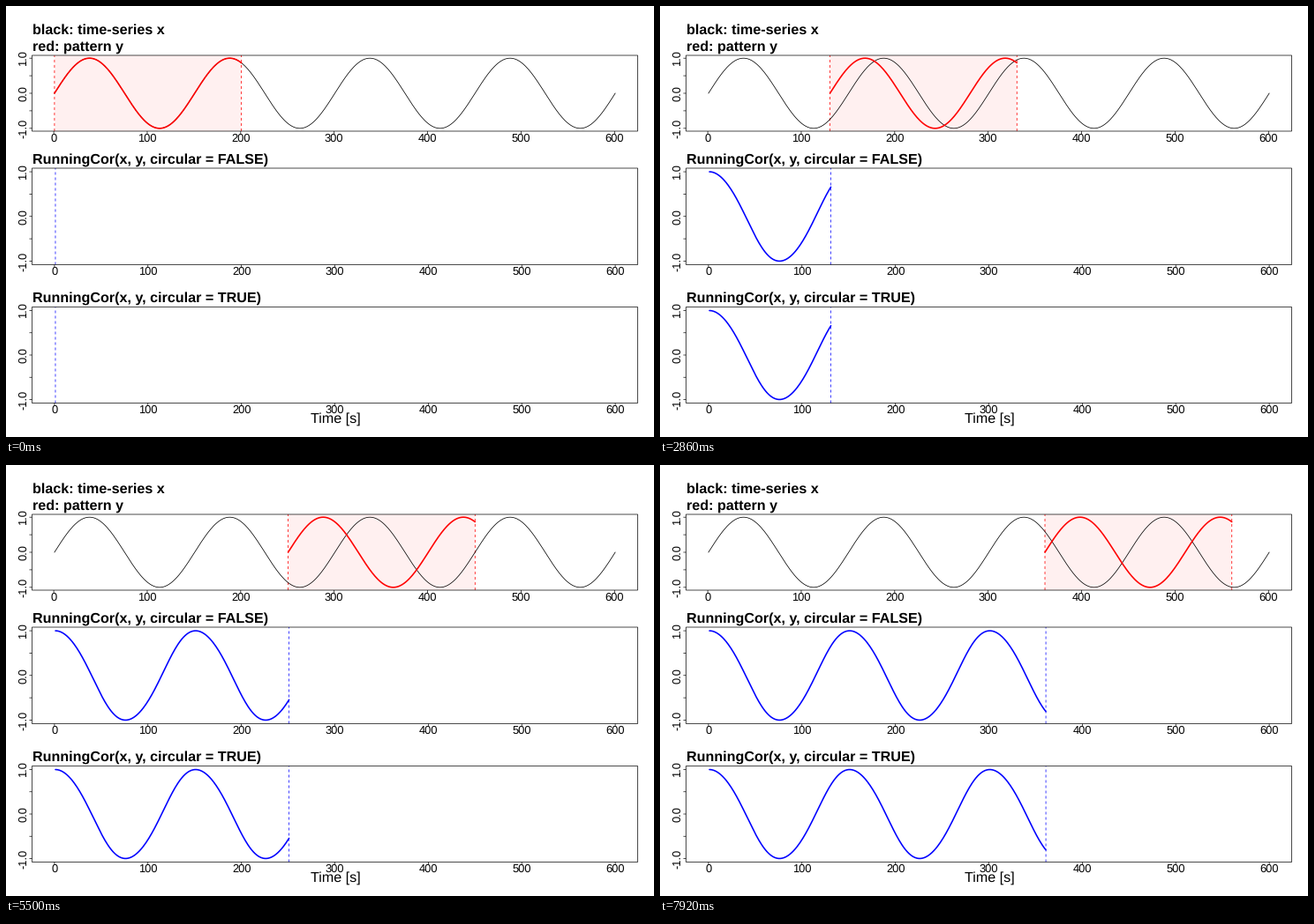
Recreate the animation shown at these times as a matplotlib script. Size 734 px wide and 489 px high, loop 8 s.

```python
import numpy as np
import matplotlib.pyplot as plt
from matplotlib.animation import FuncAnimation
from matplotlib.collections import LineCollection
from matplotlib.patches import Rectangle

W, H, DPI = 734, 489, 64  # a power of two keeps the pixel size exact
TICK_MS, LOOP_MS, STEP_MS = 20, 8000, 220
STEP, WINDOW, PERIOD, LENGTH = 10, 200, 150, 600
LEFT, RIGHT = 29.5, 715.5
PX = 72 / DPI  # points per pixel

plt.rcParams.update({"font.family": "Liberation Sans", "text.hinting": "none",
                     "path.snap": False})

fig = plt.figure(figsize=(W / DPI, H / DPI), dpi=DPI, facecolor="white")
ax = fig.add_axes([0, 0, 1, 1])
ax.set(xlim=(0, W), ylim=(H, 0))
ax.axis("off")

SCALE = (RIGHT - LEFT) / 1.08 / LENGTH
X0 = LEFT + 0.04 * LENGTH * SCALE


def to_x(t):
    return X0 + SCALE * np.asarray(t)


def label(x, y, text, size, **kw):
    ax.text(x, y, text, fontsize=size * PX, va="baseline",
            rotation_mode="anchor", **kw)


def line(color, width, z, **kw):
    return ax.plot([], [], color=color, lw=width * PX, zorder=z, **kw)[0]


class Panel:
    def __init__(self, top, bottom, titles, shift=0):
        self.top, self.bottom = top, bottom
        self.mid = (top + bottom) / 2
        self.amp = (bottom - top) / 2.16
        ax.add_patch(Rectangle((LEFT, top), RIGHT - LEFT, bottom - top,
                               fill=False, lw=0.7 * PX, zorder=6))
        ticks = []
        for t in range(0, LENGTH + 1, 100):
            x = to_x(t) + shift
            ticks.append([(x, bottom), (x, bottom + 3)])
            label(x, bottom + 11.5, str(t), 12.9, ha="center")
        for v in (-1, -0.5, 0, 0.5, 1):
            y = self.to_y(v)
            ticks.append([(LEFT - 3, y), (LEFT, y)])
            if abs(v) != 0.5:
                label(23, y, f"{v:.1f}", 12.9, ha="center", rotation=90)
        ax.add_collection(LineCollection(ticks, colors="black",
                                         linewidths=0.7 * PX))
        for i, text in enumerate(reversed(titles)):
            label(LEFT, top - 5.5 - 19 * i, text, 16.08, weight="bold")

    def to_y(self, v):
        return self.mid - self.amp * np.asarray(v)

    def marker(self, color):
        return line(color, 0.75, 2, dashes=(4, 4), dash_capstyle="butt")

    def place(self, marker, x):
        marker.set_data([x, x], [self.bottom, self.top])


def wave(t):
    return np.sin(2 * np.pi * t / PERIOD)


series = Panel(56, 142, ["black: time-series x", "red: pattern y"], shift=-0.8)
results = [Panel(184, 293.5, ["RunningCor(x, y, circular = FALSE)"]),
           Panel(341.5, 450.5, ["RunningCor(x, y, circular = TRUE)"])]
label(373, 473, "Time [s]", 16.08, ha="center")

t_all = np.arange(LENGTH + 1)
t_win = np.arange(WINDOW + 1)
pattern = wave(t_win)
lags = np.arange(LENGTH - WINDOW + 1)
cor = np.array([np.corrcoef(wave(t_win + k), pattern)[0, 1] for k in lags])

line("black", 0.75, 3).set_data(to_x(t_all), series.to_y(wave(t_all)))
band = ax.add_patch(Rectangle((0, series.top), WINDOW * SCALE,
                              series.bottom - series.top,
                              color="red", alpha=0.06, lw=0, zorder=1))
red = line("red", 1.6, 4, solid_capstyle="round")
edges = [series.marker("red") for _ in range(2)]
curves = [line("blue", 1.6, 4, solid_capstyle="round") for _ in results]
cursors = [p.marker("blue") for p in results]


def update(i):
    k = STEP * (i * TICK_MS // STEP_MS)
    band.set_x(to_x(k))
    red.set_data(to_x(k + t_win), series.to_y(pattern))
    for edge, t in zip(edges, (k, k + WINDOW)):
        series.place(edge, to_x(t))
    n = k + 1 if k else 0
    for panel, curve, cursor in zip(results, curves, cursors):
        curve.set_data(to_x(lags[:n] + 1), panel.to_y(cor[:n]))
        panel.place(cursor, to_x(k + 1))
    return [band, red, *edges, *curves, *cursors]


anim = FuncAnimation(fig, update, frames=LOOP_MS // TICK_MS, interval=TICK_MS,
                     repeat=True, repeat_delay=0)
plt.show()
```
